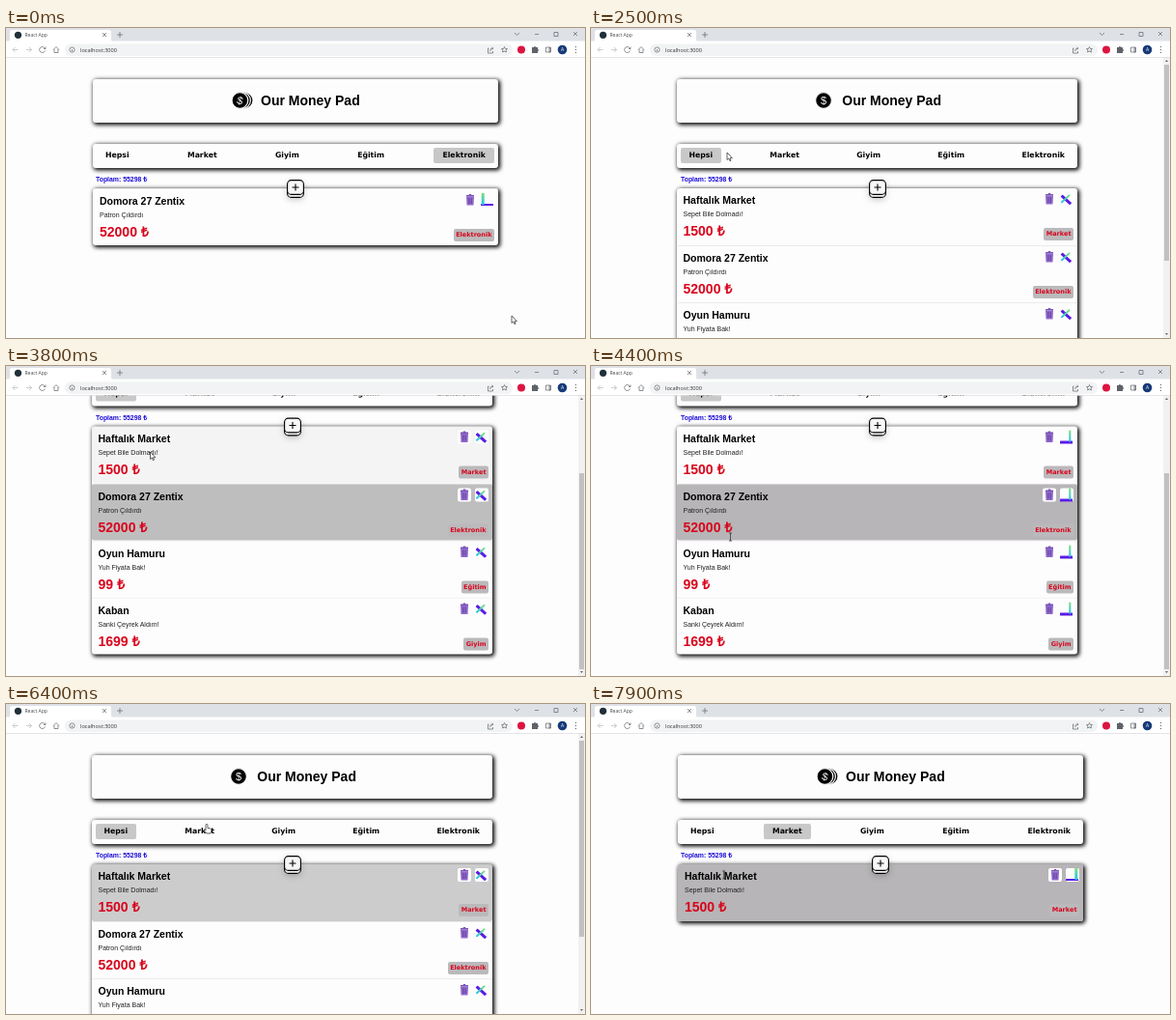
An HTML page that plays this animation: 600 px wide and 321 px high, repeating every 8 s.

```html
<!DOCTYPE html>
<html lang="tr">
<head>
<meta charset="utf-8">
<style>
html, body { margin: 0; width: 100%; height: 100%; overflow: hidden; background: #fefdfe; }
body { position: relative; font-family: "Liberation Sans", Arial, sans-serif; line-height: 1; }
body * { box-sizing: border-box; }
svg { display: block; overflow: visible; }
#page, #page div, #page b, #page svg, .over { position: absolute; white-space: nowrap; }
#page { left: 0; top: 0; width: 600px; height: 430px; --l: 90px; --w: 420px; }
#page.narrow { --l: 88.5px; --w: 415.5px; }
#page .box { left: var(--l); width: var(--w); border-radius: 3px; background: #fefdfe;
  box-shadow: 1.4px 1.4px 4px .8px #000; }
#head { top: 53px; height: 44.5px; }
#head b { left: calc(50% - 36px); top: 15.2px; font-size: 14px; }
#head svg { left: calc(50% - 55.5px); top: 21.7px; }
#nav { top: 120px; height: 24.5px; display: flex; justify-content: space-between; padding: 4px; }
#nav span { height: 16px; padding: 0 9px; border-radius: 2px; font: bold 7.75px/16px "DejaVu Sans", sans-serif; }
#nav .on { background: #c9c8c9; }
#total { left: 93px; top: 153.6px; font-size: 6.9px; color: #1a0bd8; }
#list { top: 165.7px; }
#page .card { position: relative; height: 59px; border-radius: 2px; }
.card + .card { border-top: .6px solid #ecebec; }
.card > * { left: 7px; }
.card .name { top: 7.8px; font-size: 10.5px; }
.card .note { top: 23.7px; font-size: 7px; color: #222; }
.card .price { top: 36.9px; font-size: 14px; color: #d8051c; }
#page .tag { left: auto; right: 4px; top: 41.5px; height: 12.5px; padding: 0 2.5px; border-radius: 2px;
  background: #bbb9bb; color: #d8051c; font: bold 6.5px/13px "DejaVu Sans", sans-serif; }
#page .icon { left: auto; top: 4.5px; width: 14px; height: 14px; border-radius: 2px; background: #fefdfe; }
#page .bin { right: 22px; }
#page .pen { right: 4.5px; }
.pen i { position: absolute; left: 50%; top: 50%; border-radius: .6px; }
.pen .pencil { width: 2.4px; height: 12px; margin: -6px -1.2px; background: linear-gradient(#7be07a, #22c4ee);
  transform: translate(var(--px), var(--py)) rotate(var(--pa)); }
.pen .ruler { width: 13px; height: 2.6px; margin: -1.3px -6.5px; background: #5a1be6;
  transform: translateY(var(--ry)) rotate(var(--ra)); }
#plus { left: calc(var(--l) + var(--w) / 2 - 8.7px); top: 157.2px; filter: drop-shadow(0 2px 3px #0003); }
.over { left: 0; top: 0; }
</style>
</head>
<body>
<div id="page">
  <div id="head" class="box">
    <svg width="1" height="1">
      <g fill="#000" stroke="#fefdfe" stroke-width="1.2">
        <circle class="coin" r="8.4"/><circle class="coin" r="8.4"/><circle class="coin" r="8.4"/>
      </g>
      <text id="sign" y="3.9" text-anchor="middle" fill="#fff" font-size="11">$</text>
    </svg>
    <b>Our Money Pad</b>
  </div>
  <div id="nav" class="box"></div>
  <b id="total">Toplam: 55298 ₺</b>
  <div id="list" class="box"></div>
  <svg id="plus" width="18" height="19" fill="#f8f7f8" stroke="#000" stroke-width="1.1">
    <rect x=".6" y="3" width="16.8" height="15.4" rx="4"/>
    <rect x=".6" y=".6" width="16.8" height="14.8" rx="4"/>
    <path d="M9 4.5v7M5.500 8h7"/>
  </svg>
</div>

<svg id="bar" class="over" width="600" height="321">
  <path fill="#f1f1f1" d="M593 30h7v291h-7z"/>
  <path fill="#666" d="M595 35l1.500-2 1.500 2zM595 316l1.500 2 1.500-2z"/>
  <rect id="thumb" x="594" width="5" height="203" fill="#c1c1c1"/>
</svg>

<svg class="over" width="600" height="31" fill="none" stroke="#5f6368" stroke-width=".7"
     font-family="'Open Sans', sans-serif">
  <g stroke="none">
    <path fill="#dee1e6" d="M0 0h600v14H0z"/>
    <path fill="#fff" d="M0 13.500h600V30H0zM2 14q2 0 2-2V4q0-2 2-2h100q3 0 3 2v8q0 2 2 2z"/>
    <path fill="#dcdde0" d="M0 30h600v.7H0z"/>
    <rect x="61" y="16.5" width="464" height="12.5" rx="6.2" fill="#f1f3f4"/>
    <circle cx="12.5" cy="7.3" r="3.6" fill="#20303a"/>
    <text x="19.5" y="9.2" font-size="5" fill="#45484c">React App</text>
    <text x="77" y="24.8" font-size="5.65" fill="#333">localhost:3000</text>
    <circle cx="534" cy="22.5" r="4" fill="#dc1440"/>
    <circle cx="576.5" cy="22.5" r="4.8" fill="#173a78"/>
    <text x="576.5" y="24.4" font-size="5" fill="#fff" text-anchor="middle">A</text>
    <path fill="#5f6368" d="M545 20h2a1 1 0 0 1 2 0h2v2a1 1 0 0 1 0 2v2h-6zM590 19h1v1h-1zM590 22h1v1h-1zM590 25h1v1h-1z"/>
  </g>
  <path d="M100 5l4 4m0-4l-4 4M115 7h6m-3-3v6M527 5l2.500 2.500L532 5M548 6.500h4M568 4.500h4v4h-4zM588 4l4 4m0-4l-4 4"/>
  <path d="M40.500 21.500a3 3 0 1 0 0 2M41 19.500v2h-2M49 22.500l3-3 3 3M50 22v3.500h4V22"/>
  <path stroke="#b5b7ba" d="M12.500 22.500H7m2.500-2.500L7 22.500l2.500 2.500M21 22.500h5.500M24 20l2.500 2.500L24 25"/>
  <circle cx="68.5" cy="22.5" r="2.6"/>
  <path d="M68.500 22v2M500.500 21h-1v5h5v-2M501.500 24q0-3 3-3m-1-1l1.500 1-1.500 1.500
    M516.500 19.500l1 2h2l-1.500 1.500.5 2-2-1-2 1 .5-2-1.500-1.500h2zM559.500 20h5v5h-5zM563 20v5h1v-5"/>
</svg>

<svg id="cursor" class="over" width="1" height="1" fill="#fff" stroke="#222" stroke-width=".7" stroke-linejoin="round">
  <path class="arrow" d="M0 0v7.500L1.700 6 3 8.700l1-.5-1-2.500h2.400z"/>
  <path class="text" d="M-1.500-4h3M-1.500 4h3M0-4v8"/>
  <path class="hand" d="M-1 .4q0-1 1-1t1 1v3l3 .6q1 .3 1 1.300L4 9H0L-2.500 6q-.5-1 .5-1l1 .6z"/>
</svg>

<script>
const $ = id => document.getElementById(id);
const LOOP = 8000, SCROLL = 103.5, TOP = 165.7, ROW = 59, FADE = 500, PEN = 1300, COINS = 3900;
const SHOW_ALL = 1900, SHOW_MARKET = 6600;
const tabs = ['Hepsi', 'Market', 'Giyim', 'Eğitim', 'Elektronik'];
const items = [
  ['Haftalık Market', 'Sepet Bile Dolmadı!', 1500, 'Market'],
  ['Domora 27 Zentix', 'Patron Çıldırdı', 52000, 'Elektronik'],
  ['Oyun Hamuru', 'Yuh Fiyata Bak!', 99, 'Eğitim'],
  ['Kaban', 'Sanki Çeyrek Aldım!', 1699, 'Giyim'],
];
// Mouse path: time, x, y, pointer from then on
const path = [
  [0, 524, 298, 'arrow'], [900, 512, 152, 'arrow'], [1700, 122, 138, 'hand'], [2500, 141, 129, 'arrow'],
  [2900, 148, 172, 'arrow'], [3700, 150, 160, 'arrow'], [3800, 149.5, 89, 'arrow'], [3950, 148, 140, 'arrow'],
  [4400, 144.5, 177, 'text'], [4900, 143, 251, 'arrow'], [5600, 143, 251, 'arrow'], [5850, 150, 210, 'arrow'],
  [6200, 185, 172, 'arrow'], [6400, 208, 125, 'hand'], [6800, 206, 131, 'arrow'], [7300, 150, 176, 'text'],
  [8000, 137, 177, 'text'],
];
const bin = `<svg width="14" height="14"><path fill="#9069cb" d="M3 3.500h8l-.5 9h-7z"/>
  <path fill="#7a55b6" d="M3 2h2.500L6 1h2l.5 1H11v1.500H3z"/>
  <path stroke="#64449c" stroke-width=".7" d="M5.500 5v6M7 5v6M8.500 5v6"/></svg>`;

$('nav').innerHTML = tabs.map(s => `<span>${s}</span>`).join('');
$('list').innerHTML = items.map(([name, note, price, tag]) => `<div class="card">
  <b class="name">${name}</b><div class="note">${note}</div><b class="price">${price} ₺</b>
  <div class="icon bin">${bin}</div>
  <div class="icon pen"><i class="ruler"></i><i class="pencil"></i></div>
  <div class="tag">${tag}</div></div>`).join('');

const page = $('page'), cards = [...$('list').children], buttons = [...$('nav').children];
const coins = [...document.querySelectorAll('.coin')], pointers = [...$('cursor').children];

const clamp = v => Math.min(1, Math.max(0, v));
const ease = (t, from, to) => { const u = clamp((t - from) / (to - from)); return u * u * (3 - 2 * u); };
const wave = (t, period) => Math.cos(2 * Math.PI * t / period);
const scrollAt = t => SCROLL * (ease(t, 2950, 3450) - ease(t, 5450, 5800));

function visible(t) {
  return t < SHOW_ALL ? [1] : t < SHOW_MARKET ? [0, 1, 2, 3] : [0];
}

function mouse(t) {
  const i = Math.max(1, path.findIndex(p => p[0] > t));
  const [t0, x0, y0, shape] = path[i - 1], [t1, x1, y1] = path[i], e = ease(t, t0, t1);
  return { x: x0 + (x1 - x0) * e, y: y0 + (y1 - y0) * e, shape };
}

function cardUnderMouse(t) {
  const { x, y } = mouse(t);
  return x < 510 ? visible(t)[Math.floor((y + scrollAt(t) - TOP) / ROW)] : undefined;
}

// A card's shade is the share of the last FADE ms it spent under the mouse
function shades(t) {
  const sum = items.map(() => 0), steps = 25;
  for (let k = 0; k < steps; k++) {
    const i = cardUnderMouse(t - k * FADE / steps);
    if (i !== undefined) sum[i] += 1 / steps;
  }
  return sum;
}

// Pencil scribbles along the ruler, then both cross
function drawPens(t) {
  const p = t % PEN, cross = ease(p, 700, 1150) * (1 - ease(p, 1180, 1300)), open = 1 - cross;
  const pose = {
    px: -4.3 * wave(p, 200) * open + 'px', py: -open + 'px', pa: 45 * cross + 80 * cross * open + 'deg',
    ry: 5 * open + 'px', ra: 45 * cross + 'deg',
  };
  for (const k in pose) page.style.setProperty('--' + k, pose[k]);
}

function drawCoins(t) {
  const spread = clamp(.5 + 1.5 * wave(t, COINS));
  coins.forEach((c, i) => c.setAttribute('cx', 2.6 * spread * (1 - i)));
  $('sign').setAttribute('transform', `translate(${-2.6 * spread}) rotate(${15 * spread})`);
}

function draw(t) {
  const shown = visible(t), narrow = shown.length > 1, scroll = scrollAt(t), shade = shades(t);
  const active = t < SHOW_ALL - 100 ? 4 : t < SHOW_MARKET - 100 ? 0 : 1;
  page.className = narrow ? 'narrow' : '';
  page.style.transform = `translateY(${-scroll}px)`;
  $('bar').style.display = narrow ? '' : 'none';
  $('thumb').setAttribute('y', 38 + 73 * scroll / SCROLL);

  buttons.forEach((b, i) => b.className = i === active ? 'on' : '');
  cards.forEach((c, i) => {
    c.style.display = shown.includes(i) ? '' : 'none';
    c.style.background = `rgba(183,181,183,${shade[i]})`;
  });
  drawPens(t);
  drawCoins(t);

  const { x, y, shape } = mouse(t);
  $('cursor').style.transform = `translate(${x}px,${y}px)`;
  pointers.forEach(p => p.style.display = p.classList.contains(shape) ? '' : 'none');
}

const start = performance.now();
(function tick() {
  draw((performance.now() - start) % LOOP);
  requestAnimationFrame(tick);
})();
</script>
</body>
</html>
```
